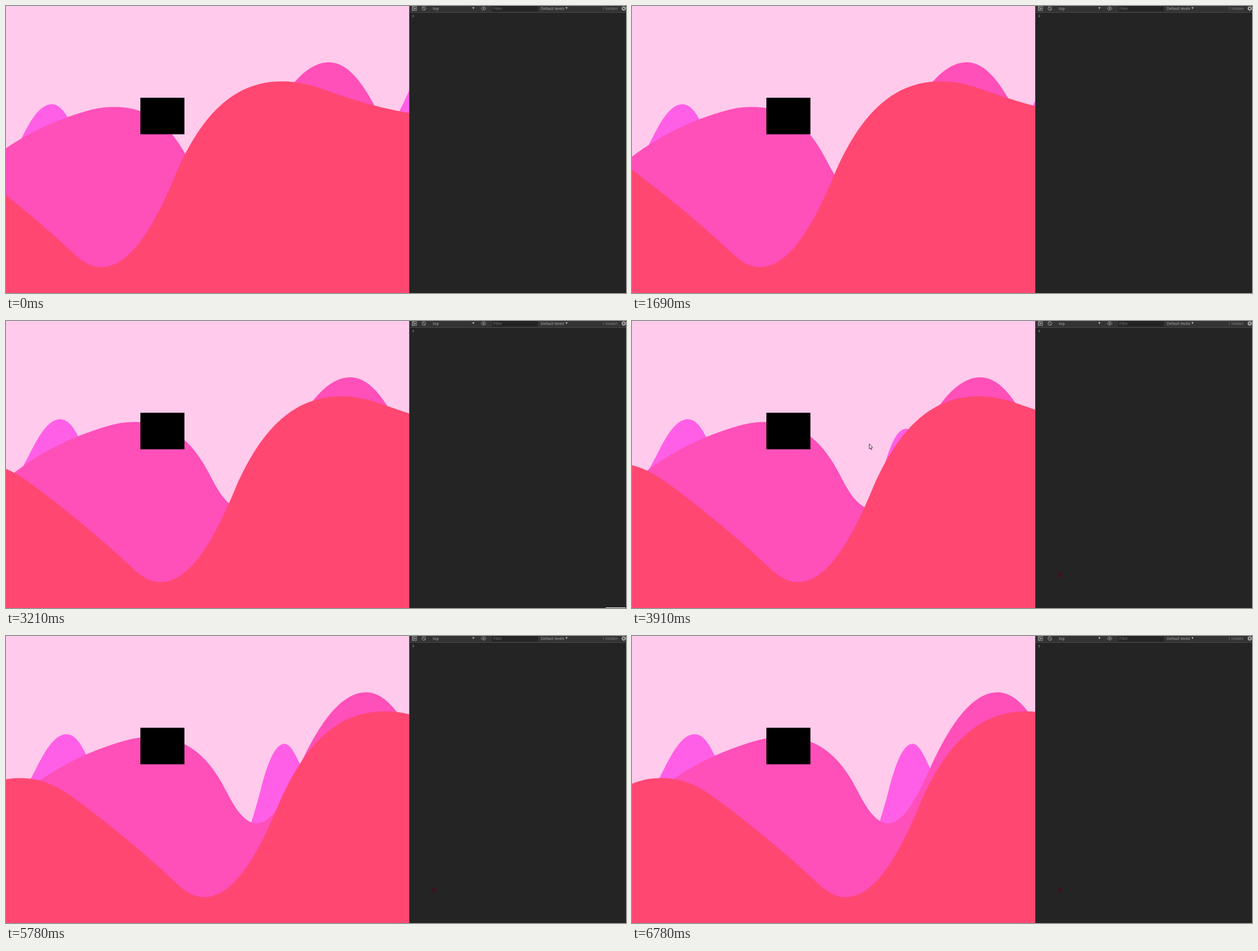
An HTML page with a canvas that plays this animation: 1098 px wide and 510 px high, repeating every 6870 ms.

```html
<!DOCTYPE html>
<html lang="en">
<head>
<meta charset="utf-8">
<title>Parallax hills</title>
<style>
  html, body { margin: 0; width: 100%; height: 100%; overflow: hidden; background: #242424; }
  canvas { display: block; }
</style>
</head>
<body>
<canvas id="stage" width="1098" height="510"></canvas>
<script>
const ctx = document.getElementById('stage').getContext('2d');
const LOOP = 6870, SPLIT = 714, W = 1098, H = 510;
const ICON = '#a8a8a8', TEXT = '#b4b4b4';

// Time, scroll of the nearest hill
const scroll = [[0, 0], [1690, 58], [3210, 105], [3910, 125], [5780, 182.5], [6780, 209.5]];
// Time, x, y of the pointer
const pointer = [[3300, 1050, 500], [3560, 757, 447], [3910, 420, 218],
  [4840, 323, 225], [5250, 335, 230], [5680, 848, 455]];

// Far to near; knots are x, y, slope
const hills = [
  { color: '#ff5fe6', rate: 0.143, knots: [
    [-40, 350, -1.5], [28, 234, -2], [81, 174.5, 0], [109, 198, 1.8], [250, 440, 0],
    [409, 329, -3.3], [425, 273, -4], [467, 191.5, 0], [498, 235, 2], [580, 300, 0],
    [714, 150, -2.3], [740, 110, 0]] },
  { color: '#ff4fb9', rate: 0.36, knots: [
    [-90, 330, -1], [-25, 271, -0.78], [145, 186, -0.28], [193, 179.5, 0], [324, 275, 2],
    [378, 333, 0], [453, 234, -2.2], [572.5, 100, 0], [653, 178, 1.9], [740, 320, 1]] },
  { color: '#ff4772', rate: 1, knots: [
    [-212, 263.5, -0.4], [-156.5, 252.5, 0], [-64.5, 286.5, 0.72], [120, 440, 0.95],
    [169, 464, 0], [298, 305, -2.4], [488, 134, 0], [570, 151, 0.35], [714, 190, 0.17]] }
];

// Linear interpolation over rows of [time, ...values]
function at(keys, t) {
  let i = 0;
  while (i < keys.length - 2 && t > keys[i + 1][0]) i++;
  const [t0, ...a] = keys[i], [t1, ...b] = keys[i + 1];
  const k = Math.min(1, Math.max(0, (t - t0) / (t1 - t0)));
  return a.map((v, j) => v + (b[j] - v) * k);
}

function rect(color, x, y, w, h) {
  ctx.fillStyle = color;
  ctx.fillRect(x, y, w, h);
}

function trace(points) {
  ctx.beginPath();
  points.forEach(([x, y]) => ctx.lineTo(x, y));
}

function line(...points) {
  trace(points);
  ctx.stroke();
}

function poly(color, ...points) {
  ctx.fillStyle = color;
  trace(points);
  ctx.closePath();
  ctx.fill();
}

function ring(x, y, r) {
  ctx.beginPath();
  ctx.arc(x, y, r, 0, Math.PI * 2);
  ctx.stroke();
}

function label(text, x, color) {
  ctx.font = '6.7px "Open Sans", "Noto Sans", sans-serif';
  ctx.fillStyle = color;
  ctx.fillText(text, x, 7);
}

// Smooth curve through the knots; flat knots get longer handles
function hillCurve(knots) {
  const reach = slope => 0.4 - 0.13 * Math.min(1, Math.abs(slope));
  ctx.lineTo(knots[0][0], knots[0][1]);
  for (let i = 1; i < knots.length; i++) {
    const [x0, y0, m0] = knots[i - 1], [x1, y1, m1] = knots[i];
    const a = (x1 - x0) * reach(m0), b = (x1 - x0) * reach(m1);
    ctx.bezierCurveTo(x0 + a, y0 + a * m0, x1 - b, y1 - b * m1, x1, y1);
  }
}

function drawHill({ color, rate, knots }, shift) {
  ctx.save();
  ctx.translate(shift * rate, 0);
  ctx.fillStyle = color;
  ctx.beginPath();
  ctx.moveTo(knots[0][0], H);
  hillCurve(knots);
  ctx.lineTo(knots.at(-1)[0], H);
  ctx.fill();
  ctx.restore();
}

function drawScene(t) {
  const [shift] = at(scroll, t);
  rect('#ffcaeb', 0, 0, SPLIT, H);
  hills.forEach(hill => drawHill(hill, shift));
  rect('#000', 238, 163, 78, 65);
}

function drawIcons() {
  ctx.strokeStyle = ICON;
  ctx.lineWidth = 0.9;
  ctx.strokeRect(719.5, 1, 7.5, 7);
  line([721.3, 1], [721.3, 8]);
  poly(ICON, [723, 2.3], [726, 4.5], [723, 6.7]);

  ring(740, 4.4, 3.3);
  line([737.7, 2.1], [742.3, 6.7]);

  ctx.beginPath();
  ctx.moveTo(841.3, 4.4);
  ctx.quadraticCurveTo(845.8, -1.4, 850.3, 4.4);
  ctx.quadraticCurveTo(845.8, 10.2, 841.3, 4.4);
  ctx.stroke();
  ring(845.8, 4.4, 1.1);

  for (const x of [827.7, 992.7]) poly(ICON, [x - 2, 2], [x + 2, 2], [x, 6]);
  line([720, 15.8], [722.2, 17.9], [720, 20]);

  ctx.lineWidth = 1.8;
  ring(1094, 4.4, 2.3);
  for (let i = 0; i < 8; i++) {
    const c = Math.cos(i * Math.PI / 4), s = Math.sin(i * Math.PI / 4);
    line([1094 + c * 2.6, 4.4 + s * 2.6], [1094 + c * 4, 4.4 + s * 4]);
  }
}

function drawPanel() {
  rect('#242424', SPLIT, 0, W - SPLIT, H);
  rect('#333', SPLIT, 0, W - SPLIT, 11);
  rect('#494949', SPLIT, 11, W - SPLIT, 1);
  rect('#3d3d3d', SPLIT, 0, 1, H);
  rect('#242424', 861, 0, 81, 10);
  drawIcons();
  label('top', 756, TEXT);
  label('Filter', 863, '#777');
  label('Default levels', 947, TEXT);
  label('1 hidden', 1056, '#8c8c8c');
}

function drawPointer(x, y) {
  ctx.save();
  ctx.translate(x, y);
  ctx.strokeStyle = '#222';
  ctx.lineWidth = 0.9;
  poly('#fff', [0.4, 0.4], [0.4, 9.2], [2.3, 7.5], [3.6, 10.5], [5, 9.9], [3.7, 7], [6.2, 6.8]);
  ctx.stroke();
  ctx.restore();
}

function drawOverlay(t) {
  if (t >= 3040 && t < 3450) rect('#f4f4f4', 1062, 509, 35, 1);
  if (t >= 3560) poly('#480a24', [755, 446], [757, 446], [760.5, 449.5], [760, 455], [756, 456]);
  if (t >= pointer[0][0] && t <= pointer.at(-1)[0]) drawPointer(...at(pointer, t));
}

function frame() {
  const t = performance.now() % LOOP;
  drawScene(t);
  drawPanel();
  drawOverlay(t);
  requestAnimationFrame(frame);
}
frame();
</script>
</body>
</html>
```
